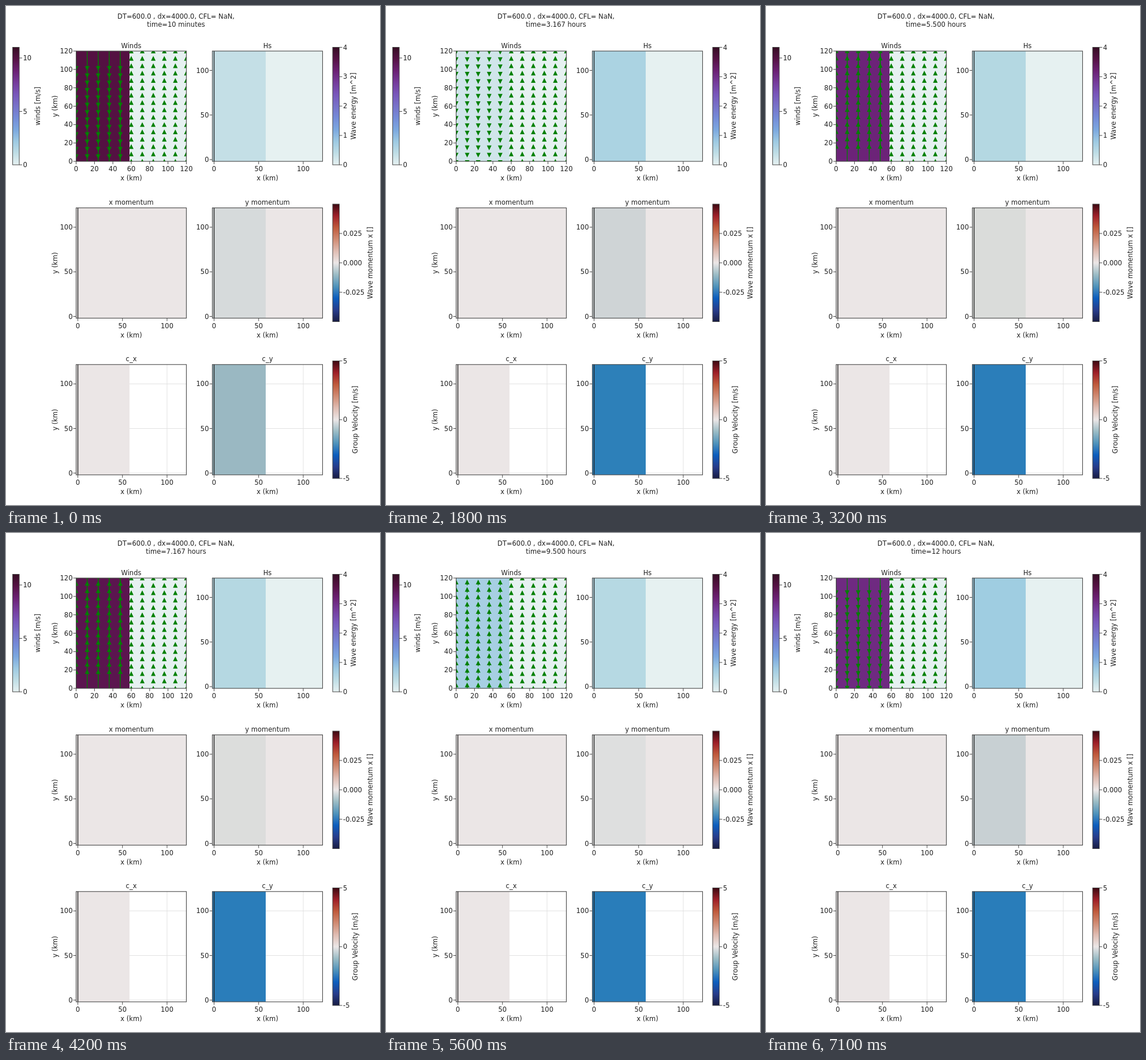
An HTML page with a canvas for the animation above (7.2 s loop, 648 px wide and 864 px high).

```html
<!DOCTYPE html>
<html lang="en">
<head>
<meta charset="utf-8">
<title>Wave model</title>
<style>
html, body { margin: 0; width: 100%; height: 100%; overflow: hidden; background: #fff; }
canvas { display: block; }
</style>
</head>
<body>
<canvas id="stage" width="648" height="864"></canvas>
<script>
const ctx = document.getElementById('stage').getContext('2d');
const FRAME_MS = 100, FRAMES = 72, WIND_PERIOD = 13.2;
const LEFT = 121.5, RIGHT = 357.5, SIZE = 191, HALF = 92.5;
const ROWS = [78, 349.5, 620.8];
const INK = '#222', SPINE = '#484848', CALM = '#e6f1f1', NEUTRAL = '#ebe6e6';

const DENSE = ['e6f1f1', 'bfdde5', '9dc9e2', '7ba7df', '748bd8', '7771c9',
  '7856ba', '753b9b', '6b2073', '561144', '360e24'];
const BALANCE = ['181c43', '263c8c', '0c5ebe', '5093bb', '9bbcc5', 'ebe6e6',
  'dfbcb2', 'd08b73', 'bf5a3c', '9e1f28', '3c0912'];

// Sampled colours of the western half at the given hours
const HOURS = [1 / 6, 1.5, 19 / 6, 5.5, 25 / 3, 10.5, 11, 12];
const HEIGHT = ['c4dfe6', '9ecae2', 'abd3e2', 'b4d8e2', 'b5d8e2', 'b7d9e3', 'b4d7e3', '9fcde1'];
const MOMENTUM = ['d6dadb', 'b6c7cc', 'cfd4d6', 'dadcda', 'dddddd', 'dfe0e1', 'dcdedf', 'c8d0d3'];
const SPEED = ['9ab8c2', '3e8ab8', '2d80b9', '2b7eba', '297dba', '297dba', '297dba', '297dba'];

const mix = (a, b, f) => {
  const channel = i => {
    const [u, v] = [a, b].map(c => parseInt(c.substr(i, 2), 16));
    return Math.round(u + (v - u) * f);
  };
  return `rgb(${channel(0)},${channel(2)},${channel(4)})`;
};

function sampleMap(map, value) {
  const p = value * (map.length - 1), i = Math.min(Math.floor(p), map.length - 2);
  return mix(map[i], map[i + 1], p - i);
}

function colourAt(colours, hour) {
  let i = 0;
  while (i < HOURS.length - 2 && hour > HOURS[i + 1]) i++;
  const f = (hour - HOURS[i]) / (HOURS[i + 1] - HOURS[i]);
  return mix(colours[i], colours[i + 1], i ? f : Math.sqrt(f));
}

function rect(x, y, w, h, colour) {
  ctx.fillStyle = colour;
  ctx.fillRect(x, y, w, h);
}

function line(x1, y1, x2, y2, colour = SPINE, width = 1) {
  ctx.strokeStyle = colour;
  ctx.lineWidth = width;
  ctx.beginPath();
  ctx.moveTo(x1, y1);
  ctx.lineTo(x2, y2);
  ctx.stroke();
}

function text(str, x, y, align = 'center', turn = 0) {
  ctx.save();
  ctx.translate(x, y);
  ctx.rotate(turn);
  ctx.font = '11.5px "DejaVu Sans", sans-serif';
  ctx.textAlign = align;
  ctx.fillStyle = INK;
  ctx.fillText(str, 0, 4);
  ctx.restore();
}

const sideways = (str, x, y) => text(str, x, y, 'center', -Math.PI / 2);

function axes(x, y, title, step, last, origin, scale) {
  const bottom = y + SIZE;
  ctx.strokeStyle = SPINE;
  ctx.lineWidth = 1.1;
  ctx.strokeRect(x, y, SIZE, SIZE);
  for (let v = 0; v <= last; v += step) {
    const tx = x + origin + v * scale, ty = bottom - origin - v * scale;
    line(tx, bottom, tx, bottom + 5);
    line(x - 5, ty, x, ty);
    text(v, tx, bottom + 13);
    text(v, x - 6, ty, 'right');
  }
  text(title, x + SIZE / 2, y - 9.5);
  text('x (km)', x + SIZE / 2, bottom + 29);
  if (x === LEFT) sideways('y (km)', 85, y + SIZE / 2);
}

function panel(x, y, title, west, east) {
  if (east) rect(x, y, SIZE, SIZE, east);
  else {
    line(x + 157.5, y, x + 157.5, y + SIZE, '#e2e2e2');
    for (const v of [0, 50, 100]) {
      const gy = y + SIZE - 3 - v * 1.545;
      line(x, gy, x + SIZE, gy, '#e2e2e2');
    }
  }
  rect(x, y, HALF, SIZE, west);
  line(x + 3, y, x + 3, y + SIZE, '#222', 1.4);
  axes(x, y, title, 50, 100, 3, 1.545);
}

function colourBar(x, y, map, label, labelX, min, max, ticks) {
  const h = 203.5, gradient = ctx.createLinearGradient(0, y + h, 0, y);
  map.forEach((c, i) => gradient.addColorStop(i / (map.length - 1), '#' + c));
  rect(x, y, 11.5, h, gradient);
  ctx.strokeStyle = SPINE;
  ctx.lineWidth = 1;
  ctx.strokeRect(x, y, 11.5, h);
  for (const tick of ticks) {
    const ty = y + h * (max - tick) / (max - min);
    line(x + 11.5, ty, x + 16.5, ty);
    text(tick, x + 18, ty, 'left');
  }
  sideways(label, labelX, y + h / 2);
}

function arrow(x, y, wind) {
  const tip = y - wind * 3, dir = wind < 0 ? -1 : 1;
  line(x, y, x, tip, '#008000', 1.2);
  ctx.fillStyle = '#008000';
  ctx.beginPath();
  ctx.moveTo(x, tip - 4.2 * dir);
  ctx.lineTo(x - 4, tip + 4 * dir);
  ctx.lineTo(x + 4, tip + 4 * dir);
  ctx.fill();
}

function windPanel(wind) {
  const x = LEFT, y = ROWS[0], scale = SIZE / 120;
  rect(x, y, SIZE, SIZE, CALM);
  rect(x, y, HALF, SIZE, sampleMap(DENSE, Math.abs(wind) / 11));
  ctx.save();
  ctx.beginPath();
  ctx.rect(x, y, SIZE, SIZE);
  ctx.clip();
  for (let east = 0; east <= 120; east += 12)
    for (let north = 0; north <= 120; north += 8)
      arrow(x + east * scale, y + SIZE - north * scale, east < 58 ? wind : 0);
  ctx.restore();
  axes(x, y, 'Winds', 20, 120, 0, scale);
}

function prettyTime(minutes) {
  if (minutes < 60) return minutes + ' minutes';
  if (minutes === 60) return '1 hour';
  return (minutes % 60 ? (minutes / 60).toFixed(3) : minutes / 60) + ' hours';
}

function draw(frame) {
  const minutes = (frame + 1) * 10, hour = minutes / 60;
  rect(0, 0, 648, 864, '#fff');
  text('DT=600.0 , dx=4000.0, CFL= NaN,', 294.5, 18);
  text('time=' + prettyTime(minutes), 294.5, 31.5);

  windPanel(-10 * Math.cos(2 * Math.PI * hour / WIND_PERIOD));
  panel(RIGHT, ROWS[0], 'Hs', colourAt(HEIGHT, hour), CALM);
  panel(LEFT, ROWS[1], 'x momentum', NEUTRAL, NEUTRAL);
  panel(RIGHT, ROWS[1], 'y momentum', colourAt(MOMENTUM, hour), NEUTRAL);
  panel(LEFT, ROWS[2], 'c_x', NEUTRAL);
  panel(RIGHT, ROWS[2], 'c_y', colourAt(SPEED, hour));

  colourBar(11.5, 71.5, DENSE, 'winds [m/s]', 54.5, 0, 11, [0, 5, 10]);
  colourBar(566, 71.5, DENSE, 'Wave energy [m^2]', 601.5, 0, 4, [0, 1, 2, 3, 4]);
  colourBar(566, 343, BALANCE, 'Wave momentum x []', 631, -0.05, 0.05, ['-0.025', '0.000', '0.025']);
  colourBar(566, 614.5, BALANCE, 'Group Velocity [m/s]', 605, -5, 5, [-5, 0, 5]);
}

function tick() {
  draw(Math.floor(performance.now() / FRAME_MS) % FRAMES);
  requestAnimationFrame(tick);
}
tick();
</script>
</body>
</html>
```
